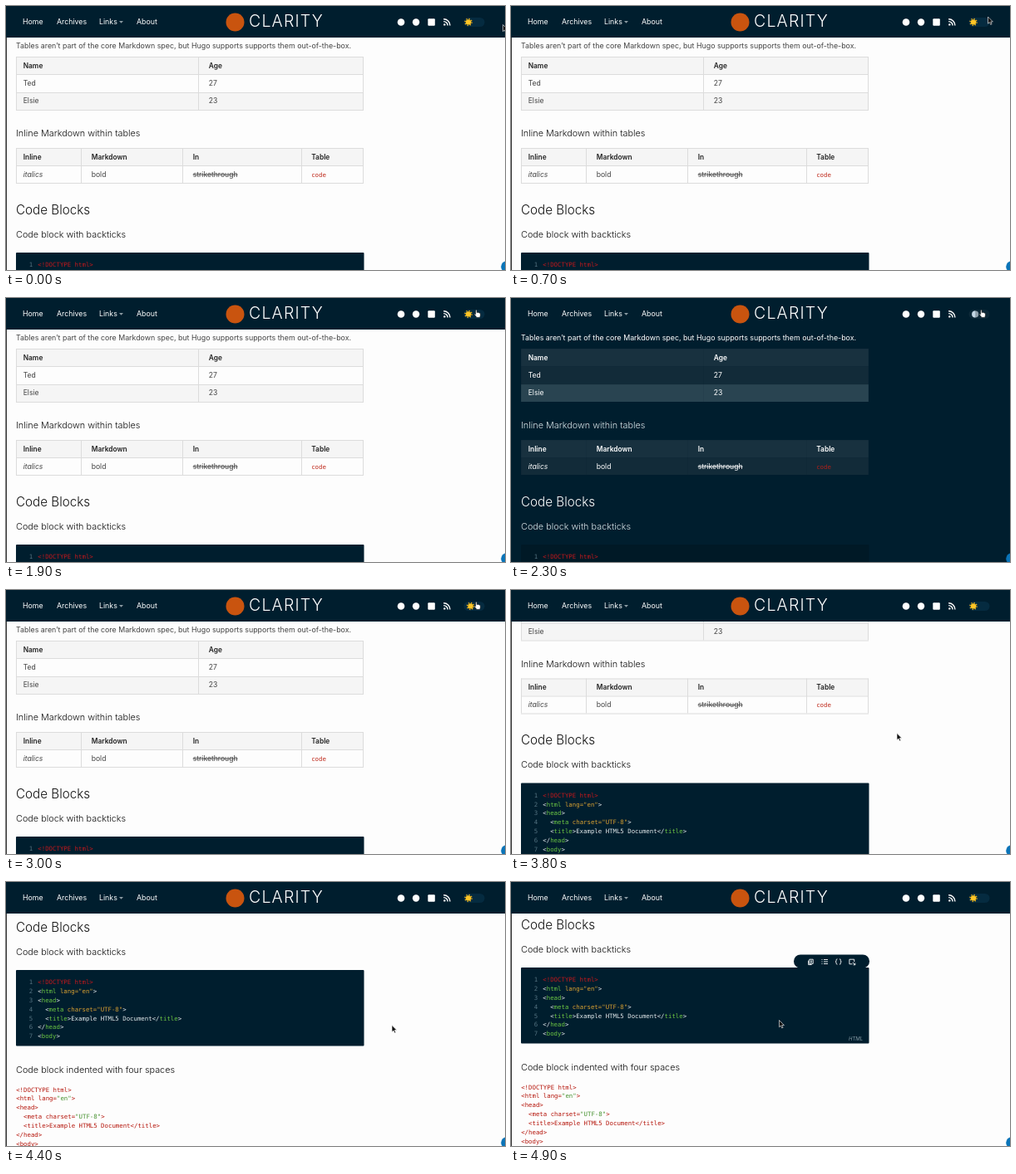
Write an HTML page that moves like this. It is 600 by 318 pixels and loops after 5000 ms.

```html
<!DOCTYPE html>
<html lang="en">
<head>
<meta charset="utf-8">
<title>Theme toggle demo</title>
<style>
html, body { margin: 0; width: 100%; height: 100%; overflow: hidden; }
svg { display: block; width: 600px; height: 318px; font-family: Inter, "Open Sans", sans-serif; }
#stage {
  --bg: #fdfdfd; --text: #444; --title: #111; --strong: #222; --line: #dcdcdc;
  --head: #f5f5f5; --odd: #fdfdfd; --even: #f5f5f5; --block: #001e2e;
  --code: #bf2a1c; --edge: #333; --pill: #052b40;
}
#stage.dark {
  --bg: #001e2e; --text: #fff; --title: #d9e2e6; --strong: #fff; --line: #001e2e18;
  --head: #18313f; --odd: #122b39; --even: #294451; --block: #001926;
  --code: #b0201a; --edge: #001e2e; --pill: #0c2837;
}
.bg { fill: var(--bg); }
.block { fill: var(--block); }
.nav { font-size: 8.8px; fill: #fff; }
.p { font-size: 8.83px; fill: var(--text); }
.td { font-size: 8.6px; fill: var(--text); }
.th { font-size: 8.4px; font-weight: 600; fill: var(--strong); }
.h2 { font-size: 15.2px; font-weight: 350; fill: var(--title); }
.h3 { font-size: 10.85px; font-weight: 350; fill: var(--title); }
.dark .h2 { fill: #fff; }
.mono { font: 7.36px "DejaVu Sans Mono", "Liberation Mono", monospace; }
.mono text { white-space: pre; }
.inline { fill: var(--code); }
.grid { fill: none; stroke: var(--line); }
.num { fill: #557482; text-anchor: end; }
.lit { fill: #e6ecee; }
.lit .doc { fill: #c4181c; }
.lit .tag { fill: #6cc644; }
.lit .attr, .lit .str { fill: #d9a032; }
.plain { fill: #b5150b; }
.plain .str { fill: #46912f; }
.icon { fill: none; stroke: #fff; stroke-width: .9; }
</style>
</head>
<body>
<svg id="stage" viewBox="0 0 600 318">
  <rect class="bg" width="600" height="318"/>

  <g id="page">
    <text class="p" x="12" y="51">Tables aren’t part of the core Markdown spec, but Hugo supports supports them out-of-the-box.</text>
    <g id="tables"></g>
    <text class="h3" x="12" y="157.3">Inline Markdown within tables</text>
    <text class="h2" x="12" y="250.5">Code Blocks</text>
    <text class="h3" x="12" y="278.7">Code block with backticks</text>
    <rect class="block" x="12" y="297" width="418.5" height="91.5" rx="1"/>
    <g id="lit" class="mono lit"></g>
    <g id="tools">
      <rect class="block" x="340" y="281.5" width="91" height="16.2" rx="8"/>
      <g class="icon">
        <path d="M358.8 287.2h4.4v5.2h-4.4zM357.6 288.6v5h4M360 289h2M360 290.6h2"/>
        <path d="M373.5 287.5h1M376 287.5h5M373.5 290h1M376 290h5M373.5 292.5h1M376 292.5h5"/>
        <path d="M392.4 286.8q-1.6 0-1.3 1.6q.2 1.4-1 1.6q1.2.2 1 1.6q-.3 1.6 1.3 1.6M395 286.8q1.6 0 1.3 1.6q-.2 1.4 1 1.6q-1.2.2-1 1.6q.3 1.6-1.3 1.6"/>
        <path d="M410.5 292.8h-3.6v-5.6h5.8v3M410.8 290.8l2.8 2.8M413.8 291.6v2.2h-2.2"/>
      </g>
      <text x="406" y="384.8" font-size="6" font-style="italic" fill="#8399a3">HTML</text>
    </g>
    <text class="h3" x="12" y="421.3">Code block indented with four spaces</text>
    <g id="plain" class="mono plain"></g>
  </g>

  <circle cx="602" cy="314" r="6.8" fill="#0a74b8"/>
  <rect width="1" height="318" fill="var(--edge)"/>

  <rect width="600" height="38" fill="#001e2e"/>
  <g class="nav">
    <text x="20" y="22">Home</text>
    <text x="61" y="22">Archives</text>
    <text x="112" y="22">Links</text>
    <path d="M136 18h5l-2.5 2.8z" fill="#8b9ba3"/>
    <text x="157" y="22">About</text>
  </g>
  <circle cx="275.5" cy="19.5" r="11" fill="#c9540f"/>
  <text x="292" y="25.3" font-size="19.5" font-weight="350" letter-spacing="1.2" fill="#fff">CLARITY</text>
  <g fill="#fff">
    <circle cx="475" cy="19.5" r="4.3"/>
    <circle cx="493" cy="19.5" r="4.2"/>
    <rect x="507.3" y="15.3" width="8.5" height="8.5" rx="1"/>
    <circle cx="527.3" cy="22.4" r="1.2"/>
    <path d="M526.1 18.6a5 5 0 0 1 5 5M526.1 15.8a7.8 7.8 0 0 1 7.8 7.8" fill="none" stroke="#fff" stroke-width="1.4"/>
  </g>

  <rect x="550.5" y="14" width="25" height="11" rx="5.5" fill="var(--pill)"/>
  <g id="knob">
    <g id="sun">
      <circle r="3.2" fill="#ffc526"/>
      <circle r="4" fill="none" stroke="#f5b414" stroke-width="1.5" stroke-dasharray="1.3 1.84"/>
    </g>
    <g id="moon">
      <circle r="4" fill="#8fa0ab"/>
      <path d="M0-4a4 4 0 0 0 0 8z" fill="#c3d6e4"/>
    </g>
  </g>

  <g id="cursor">
    <path id="arrow" d="M0 0v8.2l1.9-1.7 1.3 2.9 1.4-.6-1.3-2.8h2.6z" fill="#111" stroke="#fff" stroke-width=".6"/>
    <path id="hand" d="M.2.9q.8-1.2 1.5 0v2.5q1.3-.6 1.5.3q1.2-.4 1.4.4q1.2-.2 1.3.8v2.3q-.2 1.2-1 2.2h-3.5q-1-1.5-2.7-3.7q.2-1.1 1.5-.1z" fill="#fff" stroke="#111" stroke-width=".6"/>
  </g>
</svg>

<script>
const $ = id => document.getElementById(id);
const LOOP = 5000, STEP = 100;

// Tables: top edge, column starts, rows of cells
const tables = [
  [61.1, [12, 231.5], [["Name", "Age"], ["Ted", "27"], ["Elsie", "23"]]],
  [171, [12, 90.5, 212.5, 355], [["Inline", "Markdown", "In", "Table"],
    ['<tspan font-style="italic">italics</tspan>', "bold",
     '<tspan text-decoration="line-through">strikethrough</tspan>',
     '<tspan class="mono inline">code</tspan>']]]
];
const ROW = 21.2, RIGHT = 430;

function tableSvg([top, cols, rows]) {
  const fills = ["head", "odd", "even"];
  const edge = r => Math.round(top + r * ROW);
  let out = "";
  rows.forEach((cells, r) => {
    const y = top + r * ROW;
    out += `<rect x="12" y="${edge(r)}" width="${RIGHT - 12}" height="${edge(r + 1) - edge(r)}" fill="var(--${fills[r]})"/>`;
    cells.forEach((cell, c) => {
      const x = cols[c] + (c ? 12.2 : 8.7);
      out += `<text class="${r ? "td" : "th"}" x="${x}" y="${y + 13.6}">${cell}</text>`;
    });
  });
  const across = [...rows, 0].map((_, r) => `M12 ${edge(r) + .5}H${RIGHT}`).join("");
  const down = [...cols, RIGHT - 1].map(x => `M${Math.floor(x) + .5} ${edge(0)}V${edge(rows.length)}`).join("");
  return out + `<path class="grid" d="${across}${down}"/>`;
}

const source = [
  "<!DOCTYPE html>",
  '<html lang="en">',
  "<head>",
  '  <meta charset="UTF-8">',
  "  <title>Example HTML5 Document</title>",
  "</head>",
  "<body>"
];

function colour(line) {
  const span = (name, s) => `<tspan class="${name}">${s.replace("<", "&lt;")}</tspan>`;
  const rules = /(<!.*>)|(<\/?)(\w+)|(\w+=)(?=")|("[^"]*")/g;
  return line.replace(rules, (all, doc, open, tag, attr, str) =>
    doc ? span("doc", doc) :
    tag ? open.replace("<", "&lt;") + span("tag", tag) :
    attr ? span("attr", attr) : span("str", str));
}

function codeSvg(x, y, numbered) {
  return source.map((line, i) => {
    const base = y + i * 10.85;
    const num = numbered ? `<text class="num" x="32.3" y="${base}">${i + 1}</text>` : "";
    return `${num}<text x="${x}" y="${base}">${colour(line)}</text>`;
  }).join("");
}

$("tables").innerHTML = tables.map(tableSvg).join("");
$("lit").innerHTML = codeSvg(38.3, 314.2, true);
$("plain").innerHTML = codeSvg(12.2, 443.6, false);

// Timelines: [ms, value...]
const clicks = [950, 1590, 2280, 2880];
const scroll = [[3500, 0], [3600, 9], [3700, 33], [3800, 64.5], [3900, 104], [4000, 140],
  [4100, 166.4], [4200, 180], [4300, 187], [4400, 191], [4600, 194]];
const path = [[0, 597.5, 22.5], [600, 580, 16], [800, 567, 10], [900, 564.5, 14], [3100, 564.5, 14],
  [3400, 538, 46], [3700, 464, 172.5], [4600, 464, 172.5], [4700, 452, 172], [4900, 322.5, 166.5]];

function at(track, t) {
  const i = track.findIndex(k => k[0] > t);
  if (i === 0) return track[0].slice(1);
  if (i < 0) return track[track.length - 1].slice(1);
  const a = track[i - 1], b = track[i], p = (t - a[0]) / (b[0] - a[0]);
  return a.slice(1).map((v, j) => v + (b[j + 1] - v) * p);
}

const show = (id, on) => $(id).style.display = on ? "" : "none";

function draw(t) {
  const past = clicks.filter(c => c <= t);
  const dark = past.length % 2 === 1;
  const p = past.length ? Math.min(1, (t - past[past.length - 1]) / 300) : 1;
  const eased = 1 - (1 - p) ** 3;
  const knob = 556 + 12 * (dark ? eased : 1 - eased);
  const [x, y] = at(path, t);
  const hand = t >= 800 && t <= 3100;

  $("stage").classList.toggle("dark", dark);
  show("sun", !dark);
  show("moon", dark);
  show("hand", hand);
  show("arrow", !hand);
  show("tools", t >= 4800);
  $("knob").setAttribute("transform", `translate(${knob} 19.4)`);
  $("cursor").setAttribute("transform", `translate(${x} ${y})`);
  $("page").setAttribute("transform", `translate(0 ${-at(scroll, t)[0]})`);
}

const start = performance.now();
function tick() {
  const t = (performance.now() - start) % LOOP;
  draw(Math.floor(t / STEP) * STEP);
  requestAnimationFrame(tick);
}
tick();
</script>
</body>
</html>
```
